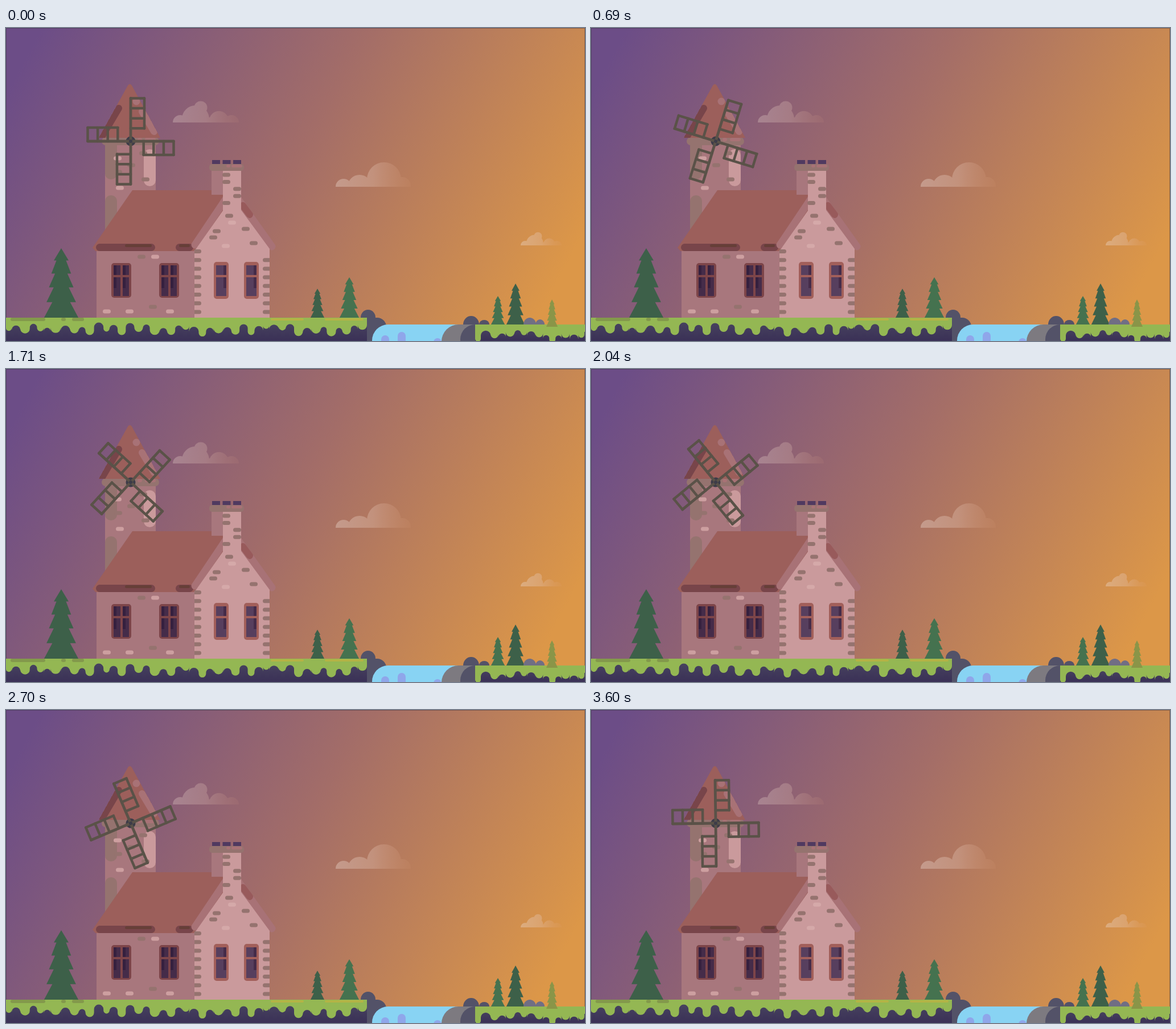
These frames come from a looping animation (1017x550 px, 3630 ms). An HTML page with a canvas:

```html
<!DOCTYPE html>
<html lang="en">
<head>
<meta charset="utf-8">
<title>Windmill at dusk</title>
<style>
  html, body { margin: 0; width: 100%; height: 100%; overflow: hidden; }
  canvas { display: block; width: 1017px; height: 550px; }
</style>
</head>
<body>
<canvas id="stage" width="1017" height="550"></canvas>
<script>
const W = 1017, H = 550, LOOP = 3630, STEP = 30, TAU = Math.PI * 2;
const back = new OffscreenCanvas(W, H);
let g = back.getContext('2d');

const C = {
  roof: '#9c5f5b', roofDark: '#78454a', trim: '#a87276',
  wall: '#a8777d', front: '#ca9a9c', brick: '#95736f', light: '#cd9fa0',
  glass: '#573f5e', dusk: '#452c49', night: '#35203f',
  pine: '#3d6049', fir: '#45724f', grass: '#94b753', shade: '#83994b',
  rock: '#535268', blade: '#5a5248', hub: '#3d3c48'
};

function rect(x, y, w, h, color, r = 0) {
  g.fillStyle = color;
  g.beginPath();
  g.roundRect(x, y, w, h, r);
  g.fill();
}

// Bar with round ends
const pill = (x, y, w, h, color) => rect(x, y, w, h, color, Math.min(w, h) / 2);
const brick = (color, x, y) => pill(x - 7, y - 3.5, 14, 7, color);

function poly(color, points) {
  g.fillStyle = color;
  g.beginPath();
  for (const [x, y] of points) g.lineTo(x, y);
  g.fill();
}

function line(color, width, x1, y1, x2, y2) {
  g.strokeStyle = color;
  g.lineWidth = width;
  g.lineCap = 'round';
  g.beginPath();
  g.moveTo(x1, y1);
  g.lineTo(x2, y2);
  g.stroke();
}

function disc(x, y, r, color) {
  g.fillStyle = color;
  g.beginPath();
  g.arc(x, y, r, 0, TAU);
  g.fill();
}

function dome(x, base, rx, ry, color) {
  g.fillStyle = color;
  g.beginPath();
  g.ellipse(x, base, rx, ry, 0, Math.PI, 0);
  g.fill();
}

function fade(x1, y1, x2, y2, ...colors) {
  const f = g.createLinearGradient(x1, y1, x2, y2);
  colors.forEach((color, i) => f.addColorStop(i / (colors.length - 1), color));
  return f;
}

function seeded(seed) {
  return () => (seed = seed * 16807 % 2147483647) / 2147483647;
}

function sky() {
  rect(0, 0, W, H, fade(48, 26, 937, 506, '#6c4d87', '#a36d68', '#dc9748'));
  g.strokeStyle = 'rgba(40,30,45,.4)';
  g.lineWidth = 1;
  g.strokeRect(.5, .5, W - 1, H + 5);
}

// Puffs are [x, y, radius] from the lower left corner
const PEAKED = [[13, 0, 13], [40, -6, 24], [49, -26, 11.5], [81, -3, 17], [103, 0, 13]];
const ROUND = [[14, 0, 14], [42, 0, 21], [85, -13, 30], [117, -2, 15]];
function cloud(x, base, scale, width, alpha, puffs) {
  g.save();
  g.translate(x, base);
  g.scale(scale, scale);
  g.beginPath();
  g.rect(0, -60, width, 60);
  g.clip();
  g.fillStyle = fade(0, 0, width, 0, `rgba(236,218,208,${alpha})`,
    `rgba(230,200,185,${alpha * .85})`, 'rgba(225,165,130,.08)');
  g.beginPath();
  for (const [px, py, r] of puffs) {
    g.moveTo(px + r, py);
    g.arc(px, py, r, 0, TAU);
  }
  g.rect(14, -9, width - 28, 9);
  g.fill();
  g.restore();
}

function tree(x, top, base, half, color) {
  const right = [[0, 0]];
  for (let k = 1; k <= 5; k++) {
    const y = k * (.17 + .006 * k);
    right.push([.29 + .143 * k, y], [.2 + .08 * k, y]);
  }
  const place = s => ([dx, y]) => [x + s * dx * half, top + y * (base - top)];
  poly(color, [...right.map(place(1)), ...right.reverse().map(place(-1))]);
}

function tower() {
  rect(174, 199, 89, 170, C.wall);
  rect(174, 200, 21, 66, C.brick, [0, 0, 10, 10]);
  rect(174, 294, 21, 70, C.brick, [10, 10, 0, 0]);
  pill(242, 213, 21, 65, C.front);
  brick(C.light, 196, 229);
  brick(C.light, 200, 281);
  brick(C.brick, 220, 241);
  brick(C.brick, 245, 266);
  brick(C.brick, 241, 220);
  brick(C.brick, 197, 253);
  pill(168, 192, 101, 14, C.brick);
  pill(231, 193, 8, 6, C.trim);
  pill(244, 193, 19, 6, C.trim);

  g.save();
  g.beginPath();
  g.moveTo(163, 193);
  g.lineTo(214, 101);
  g.quadraticCurveTo(217.5, 96, 221, 101);
  g.lineTo(271, 193);
  g.fillStyle = C.roof;
  g.fill();
  g.clip();
  line(C.roofDark, 12, 198, 141, 169, 190);
  line(C.trim, 12, 239, 147, 260, 182);
  disc(229, 129, 6.5, C.trim);
  g.restore();
}

function pane(x, w, glass, shadow, shadowX) {
  for (const [y, h] of [[417, 17], [438, 33]]) {
    rect(x, y, w, h, glass);
    rect(shadowX, y, 5, Math.min(h, 19), shadow);
  }
}

function sashWindow(x) {
  rect(x, 413, 35, 61, '#7d4549', 5);
  pane(x + 4, 12, C.dusk, C.night, x + 4);
  pane(x + 20, 11, C.dusk, C.night, x + 20);
}

function frontWindow(x) {
  rect(x, 411, 26, 65, '#a25f5a', 5);
  pane(x + 4, 18, C.glass, C.dusk, x + 17);
}

function eave(x, w, stainX, stainW) {
  pill(x, 379, w, 13, C.roofDark);
  pill(stainX, 380, stainW, 5, '#663f38');
}

function chimney() {
  rect(361, 245, 20, 48, C.wall);
  rect(381, 245, 32, 80, C.front);
  rect(357, 239, 61, 12, C.brick, 5);
  pill(387, 240, 7, 5, C.trim);
  pill(396, 240, 19, 5, C.trim);
  for (let i = 0; i < 3; i++) rect(362 + i * 18.5, 232, 14, 7, '#503a60');
  for (let i = 0; i < 5; i++) brick(C.brick, (i >> 1) % 2 ? 406 : 387, 258 + i * 12.4);
}

function house() {
  rect(159, 385, 175, 124, C.wall);
  poly(C.roof, [[222, 285], [381, 285], [400, 300], [330, 392], [157, 392], [152, 386]]);
  eave(158, 104, 209, 47);
  eave(298, 31, 304, 19);

  line(C.trim, 13, 389, 296, 332, 381);
  line(C.trim, 13, 400, 290, 467, 384);
  line('#985a5b', 12, 416, 312, 428, 328);
  poly(C.front, [[331, 509], [331, 392], [397, 298], [463, 388], [463, 509]]);
  chimney();

  brick('#d5a9a9', 397, 342);
  brick('#d5a9a9', 386, 383);
  brick(C.brick, 392, 330);
  brick(C.brick, 421, 353);
  brick(C.brick, 370, 357);
  brick(C.brick, 364, 368);
  brick(C.brick, 435, 378);
  brick(C.brick, 238, 402);
  brick(C.light, 262, 402);
  brick(C.brick, 258, 490);
  for (const x of [177, 217, 288]) brick(C.light, x, 498);
  for (let i = 0; i < 8; i++) {
    const y = 389 + i * 15.2;
    rect(331, y, 12, 7, C.brick, [0, 3.5, 3.5, 0]);
    if (i) rect(451, y, 12, 7, C.brick, [3.5, 0, 0, 3.5]);
  }
  sashWindow(185);
  sashWindow(269);
  frontWindow(365);
  frontWindow(418);
}

// Hanging grass and rounded soil in turn
function turf(left, top, right, seed) {
  const random = seeded(seed);
  rect(left, top, right - left, H - top, fade(0, top, 0, H, '#4a4761', '#3a3056'));
  g.fillStyle = C.grass;
  g.beginPath();
  g.moveTo(left, top);
  for (let x = left, hang = 1; x < right; hang = -hang) {
    const r = Math.min(5 + random() * 4, (right - x) / 2);
    const y = top + (hang > 0 ? 16 + random() * 14 : 12 + random() * 10);
    g.arc(x + r, y - hang * r / 2, r, Math.PI, 0, hang > 0);
    x += 2 * r;
  }
  g.lineTo(right, top);
  g.fill();
}

function ground() {
  dome(636, 509, 13, 14, C.rock);
  rect(630, 509, 38, 41, C.rock, [0, 16, 0, 0]);
  rect(643, 521, 160, 40, '#88d3f3', [28, 0, 0, 0]);
  pill(659, 540, 14, 30, '#8fa6ea');
  pill(688, 534, 14, 30, '#8fa6ea');
  pill(751, 545, 14, 30, '#8fa6ea');
  dome(817, 521, 14, 15, C.rock);
  dome(840, 521, 9, 8, C.rock);
  dome(920, 521, 11, 12, '#706e84');
  dome(938, 521, 8, 9, '#706e84');
  rect(765, 521, 60, 45, '#7d7a80', [30, 0, 0, 0]);
  rect(798, 521, 30, 45, C.rock, [26, 0, 0, 0]);

  turf(0, 509, 634, 71);
  turf(824, 521, W, 29);
  pill(8, 509, 61, 6, C.shade);
  pill(97, 509, 8, 6, C.shade);
  pill(116, 509, 21, 6, C.shade);
  pill(465, 510, 58, 4, '#b3b446');
  pill(560, 510, 68, 4, '#b3b446');
}

function scenery() {
  sky();
  cloud(293, 166, 1, 116, .3, PEAKED);
  cloud(579, 279, 1, 132, .38, ROUND);
  cloud(904, 382, .62, 116, .38, PEAKED);
  tree(97, 387, 509, 30, C.pine);
  tree(547, 458, 509, 12, C.pine);
  tree(603, 438, 509, 17, C.fir);
  tree(864, 471, 521, 12, C.fir);
  tree(895, 449, 521, 16, C.pine);
  tower();
  house();
  ground();
  tree(959, 477, 525, 10, '#8a9548');
}

function mill(angle) {
  g.save();
  g.translate(219, 199);
  g.rotate(angle);
  disc(0, 0, 8.5, C.hub);
  for (let i = 0; i < 4; i++) {
    line(C.blade, 4.8, 0, 0, 0, -75.5);
    line(C.blade, 4.5, 24, -75.5, 24, -22.5);
    for (let k = 0; k < 4; k++) {
      const y = -75.5 + k * 17.6;
      line(C.blade, 4.5, 0, y, 24, y);
    }
    g.rotate(TAU / 4);
  }
  disc(0, 0, 3, C.hub);
  g.restore();
}

function draw() {
  const t = Math.floor(performance.now() % LOOP / STEP) * STEP;
  g.drawImage(back, 0, 0);
  mill(t / LOOP * TAU / 4);
  requestAnimationFrame(draw);
}

scenery();
g = document.getElementById('stage').getContext('2d');
draw();
</script>
</body>
</html>
```
